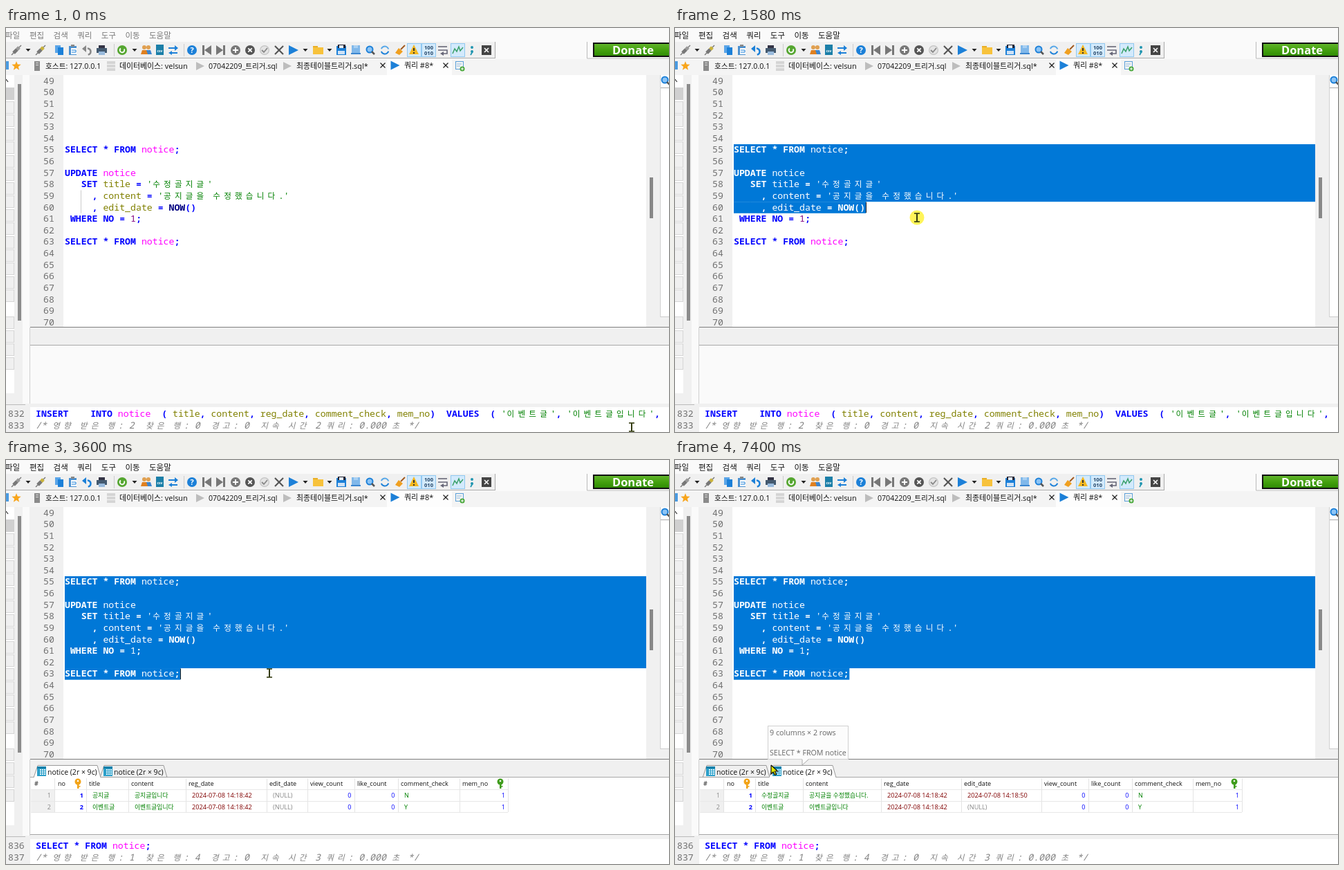
Animation, 959 px wide and 584 px high, one loop 7.86 s. Source, as an HTML page with a canvas:

```html
<!DOCTYPE html>
<html lang="ko">
<head>
<meta charset="utf-8">
<title>SQL editor</title>
<style>
  html, body { margin: 0; height: 100%; overflow: hidden; background: #fff; }
  canvas { display: block; }
</style>
</head>
<body>
<canvas id="stage" width="959" height="584"></canvas>
<script>
const c = document.getElementById('stage').getContext('2d');
const LOOP = 7860, CELL = 7.92, ROW = 16.63, TEXT_X = 85, FIRST_SEL = 55;
const MONO = '"Noto Sans Mono","Noto Sans CJK KR",monospace';
const UI = '"Open Sans","Noto Sans CJK KR","Noto Sans CJK",sans-serif';
const GRAY = '#f0f0f0', BLUE = '#1c80d8', DARK = '#555', NUMBER = '#707070';

const code = {
  55: 'SELECT * FROM notice;',
  57: 'UPDATE notice',
  58: "   SET title = '수정골지글'",
  59: "     , content = '공지글을 수정했습니다.'",
  60: '     , edit_date = NOW()',
  61: ' WHERE NO = 1;',
  63: 'SELECT * FROM notice;'
};

// Mouse path: time, x, y
const path = [
  [0, 905, 577], [250, 700, 480], [500, 330, 290], [700, 130, 195], [830, 88, 174],
  [1160, 88, 174], [1300, 150, 195], [1440, 265, 240], [1580, 350, 274], [1720, 375, 295], [1900, 381, 308],
  [3600, 381, 308], [3800, 350, 325], [4050, 270, 375], [4300, 205, 418], [4430, 185, 440],
  [6330, 185, 440], [6540, 139, 441], [LOOP, 139, 441]
];

const between = (t, a, b) => t >= a && t < b;
const rowTop = n => 168 + (n - FIRST_SEL) * ROW;
const isHangul = ch => ch > '\u3000';
const cells = ch => isHangul(ch) ? 2 : 1;
const columns = s => [...s].reduce((n, ch) => n + cells(ch), 0);

function box(color, x, y, w, h) { c.fillStyle = color; c.fillRect(x, y, w, h); }
function frame(color, x, y, w, h) { c.strokeStyle = color; c.lineWidth = 1; c.strokeRect(x + .5, y + .5, w, h); }
function disc(color, x, y, r) { c.fillStyle = color; c.beginPath(); c.arc(x, y, r, 0, 7); c.fill(); }
function ring(color, w, x, y, r, from = 0, to = 6.3) {
  c.strokeStyle = color; c.lineWidth = w; c.beginPath(); c.arc(x, y, r, from, to); c.stroke();
}
function trace(p) { c.beginPath(); for (let i = 0; i < p.length; i += 2) c.lineTo(p[i], p[i + 1]); }
function poly(color, ...p) { trace(p); c.fillStyle = color; c.fill(); }
function line(color, w, ...p) { trace(p); c.strokeStyle = color; c.lineWidth = w; c.stroke(); }
function cross(color, w, x, y, r) { line(color, w, x - r, y - r, x + r, y + r); line(color, w, x - r, y + r, x + r, y - r); }
function play(color, x, y, r = 7) { poly(color, x - r, y - r, x + r, y, x - r, y + r); }
function drop(x) { poly('#222', x - 3.5, 30, x + 3.5, 30, x, 34); }
function label(s, x, y, size, color = '#111', weight = 400, align = 'left') {
  c.font = `${weight} ${size}px ${UI}`; c.fillStyle = color; c.textAlign = align; c.fillText(s, x, y);
}

function tokenStyle(tok) {
  if (tok[0] === "'") return ['#008000', 400];
  if (tok === 'NOW') return ['#000080', 700];
  if (/^[A-Z]/.test(tok)) return ['#0000ff', 700];
  if (tok === 'notice') return ['#ff00ff', 400];
  if (/^\d/.test(tok)) return ['#800080', 400];
  if (/^\w/.test(tok)) return ['#808000', 400];
  return ['#0000ff', 600];
}
// Fixed cells; Hangul takes two and is set a little smaller.
function mono(s, x, y, color, style = '') {
  c.fillStyle = color; c.textAlign = 'left';
  for (const ch of s) {
    const wide = isHangul(ch);
    c.font = `${style} ${wide ? 11.6 : 13.2}px ${MONO}`;
    c.fillText(ch, wide ? x + .5 : x, y);
    x += cells(ch) * CELL;
  }
  return x;
}
function sql(s, x, y, selected) {
  for (const tok of s.match(/'[^']*'|\w+|./g)) {
    const [color, weight] = tokenStyle(tok);
    x = mono(tok, x, y, selected ? '#fff' : color, weight);
  }
}

function plug(x, color) {
  line('#777', 1.5, x - 7, 39, x + 7, 25);
  line('#777', 5, x - 4, 36, x + 1, 31);
  line(color, 5, x + 1, 31, x + 4, 28);
}
function floppy(color, x) {
  box(color, x - 7, 26, 14, 13); box('#223', x - 5, 24, 11, 5); box('#e8f2fc', x - 3, 25, 6, 4); box('#cfe2f5', x - 5, 33, 10, 5);
}
function person(x, color) { disc('#e0a050', x, 28, 3); poly(color, x - 5, 38, x - 3, 32, x + 3, 32, x + 5, 38); }
function lens(x, y) { disc('#8cc4f5', x, y, 4.5); ring(BLUE, 2, x, y, 4.5); line(DARK, 2.5, x + 3, y + 3, x + 7, y + 7); }

function toolbar(active) {
  box(GRAY, 0, 20, 707, 23);
  line('#aaa', 1, 0, 43.5, 707, 43.5); line('#aaa', 1, 707.5, 20, 707.5, 44);
  plug(15, '#999'); drop(32); plug(50, '#c9b23a');
  box('#5aa5e8', 71, 25, 8, 11); box(BLUE, 75, 28, 8, 11);
  box('#4a90d0', 91, 26, 11, 13); box('#fff', 94, 29, 8, 9); box('#888', 94, 24, 5, 3); line(BLUE, 1, 95, 32, 101, 32, 101, 35, 95, 35);
  const undo = active ? BLUE : '#888';
  poly(undo, 110, 30, 116, 25, 116, 35); ring(undo, 2.5, 118, 34, 4.5, -1.6, 1.4);
  box('#334', 134, 25, 9, 4); box('#445a70', 131, 29, 15, 7); box('#9bd', 134, 34, 9, 5);
  line('#ccc', 1, 156.5, 23, 156.5, 41);
  disc('#55a630', 168, 32, 7); ring('#fff', 1.8, 168, 32, 3.3, -.5, 4); drop(186);
  person(206, '#3c86cf'); person(200, '#e08020');
  box('#1b7fa8', 217, 24, 11, 15); label('csv', 222.5, 35, 5, '#fff', 700, 'center');
  line(BLUE, 2, 235, 29, 245, 29); poly(BLUE, 244, 25, 249, 29, 244, 33);
  line(BLUE, 2, 239, 36, 248, 36); poly(BLUE, 240, 33, 235, 36, 240, 39);
  line('#ccc', 1, 257.5, 23, 257.5, 41);
  disc(BLUE, 269, 32, 7); label('?', 269, 36, 11, '#fff', 700, 'center');
  box('#777', 284, 25, 3, 14); poly('#777', 297, 25, 287, 32, 297, 39);
  box('#777', 314, 25, 3, 14); poly('#777', 304, 25, 314, 32, 304, 39);
  disc('#777', 332, 32, 7); line('#fff', 2, 328, 32, 336, 32); line('#fff', 2, 332, 28, 332, 36);
  disc(DARK, 353, 32, 7); cross('#fff', 1.8, 353, 32, 2.7);
  disc('#c4c4c4', 374, 32, 7); disc('#e4e4e4', 374, 32, 5.8); line('#888', 1.8, 370, 32, 373, 35, 378, 29);
  cross('#555', 2.2, 395, 32, 6);
  play(BLUE, 416, 32); drop(433);
  box('#e9ae25', 444, 26, 7, 4); box('#f7c23c', 444, 28, 15, 10); drop(468);
  floppy(BLUE, 485);
  box('#80b8ea', 500, 25, 12, 11); box('#a9d0f2', 503, 25, 6, 4); line('#3c86cf', 2, 499, 37, 513, 37);
  lens(526, 31);
  ring(BLUE, 2, 548, 32, 5.5, .3, 2.8); ring('#58a8e8', 2, 548, 32, 5.5, 3.5, 6);
  line('#a05a20', 2, 577, 25, 571, 31); poly('#f0a020', 568, 29, 574, 34, 569, 39, 563, 36);
  for (const x of [580, 601, 643]) { box('#d3eafc', x, 22, 20, 19); frame('#90c8f0', x, 22, 20, 19); }
  poly('#f5b820', 590, 24, 597, 38, 583, 38); box('#333', 589, 29, 2, 4); box('#333', 589, 35, 2, 2);
  label('100', 611.5, 31, 7.5, '#246', 700, 'center'); label('010', 611.5, 39, 7.5, '#246', 700, 'center');
  line('#667', 1.6, 625, 27, 638, 27); line('#667', 1.6, 625, 32, 638, 32, 638, 37, 632, 37); poly('#667', 628, 37, 633, 34, 633, 40);
  line('#39a06a', 1.5, 646, 37, 649, 30, 652, 34, 655, 27, 657, 33, 661, 28);
  disc('#2095b0', 674, 28, 2); disc('#2095b0', 674, 34, 2); line('#2095b0', 1.8, 675, 34, 672, 39);
  box('#444', 688, 25, 14, 14); cross('#fff', 1.6, 695, 32, 3);

  line('#bbb', 1, 840.5, 20, 840.5, 44, 959, 44);
  const g = c.createLinearGradient(0, 22, 0, 42);
  g.addColorStop(0, '#62b52c'); g.addColorStop(.5, '#43a00e'); g.addColorStop(1, '#2c8803');
  box('#111', 849, 21, 110, 21); box(g, 851, 23, 108, 17);
  label('Donate', 907, 38, 16.5, '#fff', 700, 'center');
}

function tabs() {
  box('#f4f4f4', 0, 45, 959, 23);
  box('#fdfdfd', 551, 45, 94, 23);
  box('#4a9be0', 0, 48, 4, 12);
  c.beginPath();
  for (let i = 0; i < 10; i++) {
    const r = i % 2 ? 3 : 7, a = -Math.PI / 2 + i * Math.PI / 5;
    c.lineTo(15 + r * Math.cos(a), 55 + r * Math.sin(a));
  }
  c.fillStyle = '#f8a51b'; c.fill();
  box('#8a8a8a', 41, 48, 8, 14); box('#ddd', 43, 50, 4, 1); box('#ddd', 43, 53, 4, 1);
  for (const y of [48, 53, 58]) box('#d5d5d5', 146, y, 12, 4);
  play('#bdbdbd', 281, 55, 6); play('#bdbdbd', 407, 55, 6); play(BLUE, 563, 54, 6.5);
  label('호스트: 127.0.0.1', 57, 59, 10.7);
  label('데이터베이스: velsun', 164, 59, 10.9);
  label('07042209_트리거.sql', 293, 59, 10.6);
  label('최종테이블트리거.sql*', 420, 59, 10.9);
  label('쿼리 #8*', 576, 58, 10.9);
  cross('#222', 1.3, 545, 54, 3.5); cross('#222', 1.3, 636, 54, 3.5);
  frame('#5a9fd8', 650, 48, 11, 11); line('#8ab8e0', 1, 652, 52, 659, 52); line('#8ab8e0', 1, 652, 55, 657, 55);
  disc('#49a83a', 660, 59, 3.5); line('#fff', 1, 658, 59, 662, 59); line('#fff', 1, 660, 57, 660, 61);
}

function sidePanels() {
  box(GRAY, 0, 68, 35, 480);
  box('#fff', 0, 68, 12, 460);
  box('#fafafa', 24, 68, 10, 475);
  line('#333', 1.2, 0, 74, 3, 78);
  box('#d0d0d0', 0, 86, 12, 18);
  for (let i = 0; i < 20; i++) {
    if (i === 15) continue;
    const y = Math.round(106 + 19.45 * i);
    box(GRAY, 0, y, 11, 17); frame('#d6d6d6', -2, y, 13, 17);
  }
  box('#8c8c8c', 17, 81, 5, 342);
  line('#bbb', 1, 0, 544.5, 28, 544.5);
  box(GRAY, 942, 68, 5, 365); box('#fff', 947, 68, 12, 350); box(GRAY, 947, 418, 12, 15);
  line('#d0d0d0', 1, 946.5, 68, 946.5, 418); line('#aaa', 1, 947, 86.5, 959, 86.5); line('#ccc', 1, 947, 417.5, 959, 417.5);
  lens(953, 75);
}

function editor(selRow, selCol, caretOn) {
  box('#fff', 35, 68, 891, 365);
  box(GRAY, 35, 68, 48, 365);
  box(GRAY, 926, 68, 16, 365);
  box('#888', 931, 216, 5, 59);
  line('#ccc', 1, 108.5, rowTop(59), 108.5, rowTop(61));
  if (selRow) {
    box('#0078d7', TEXT_X, rowTop(FIRST_SEL), 841, (selRow - FIRST_SEL) * ROW);
    box('#0078d7', TEXT_X, rowTop(selRow), selCol * CELL + 1, ROW);
  }
  for (let n = 49; n <= 70; n++) {
    const y = Math.round(rowTop(n) + 12.4);
    mono(String(n), 54, y, NUMBER);
    if (code[n]) sql(code[n], TEXT_X, y, n <= selRow);
  }
  if (caretOn) box('#222', Math.floor(TEXT_X + selCol * CELL) + 1, rowTop(selRow) + .5, 1, 15.5);
  box('#808080', 35, 432, 907, 1);
  box('#808080', 942, 432, 17, 1);
}

function key(color, x) {
  disc(color, x, 465, 4.5); disc('#fff', x, 464, 1.3); box(color, x - 1, 468, 2.5, 7); box(color, x, 471, 3.5, 1.5);
}
function resultTab(x, active) {
  const shape = [x, 459, x + 6, 441.5, x + 92, 441.5, x + 97, 459];
  poly(active ? '#fff' : GRAY, ...shape);
  line('#999', 1, ...shape);
  if (!active) line('#a0a0a0', 1, x, 458.5, x + 97, 458.5);
  box('#2c9fc9', x + 5, 443, 13, 14); box('#1680aa', x + 5, 443, 13, 3);
  for (let i = 0; i < 9; i++) box('#e4f6fc', x + 9 + i % 3 * 3, 447 + (i / 3 | 0) * 3, 2, 2);
  label('notice (2r × 9c)', x + 20, 455, 10.5);
}
function grid(second) {
  const names = ['title', 'content', 'reg_date', 'edit_date', 'view_count', 'like_count', 'comment_check', 'mem_no'];
  const xs = second ? [120, 189, 302, 418, 534, 602, 665, 753, 824] : [120, 181, 264, 381, 440, 508, 571, 660, 730];
  const end = xs[8] - 4, stamp = '2024-07-08 14:18:42';
  const rows = [
    second ? ['수정골지글', '공지글을 수정했습니다.', stamp, '2024-07-08 14:18:50'] : ['공지글', '공지글입니다', stamp, '(NULL)'],
    ['이벤트글', '이벤트글입니다', stamp, '(NULL)']
  ];
  box('#fff', 36, 459, 923, 82);
  box(GRAY, 36, 476, 34, 33);
  for (const y of [476, 493, 509]) box('#e8e8e8', 36, y, end - 36, 1);
  for (const x of [74, ...xs]) box('#e4e4e4', x - 4, 460, 1, 49);
  label('#', 41, 471, 9); label('no', 75, 471, 9);
  names.forEach((s, i) => label(s, xs[i], 471, 9.1));
  key('#f2a316', 104); key('#3f9c1c', end - 11);
  rows.forEach((row, r) => {
    const y = 488 + r * 16.5;
    label(r + 1, 65, y, 9, '#888', 400, 'right');
    label(r + 1, 112, y, 9, '#0000ff', 700, 'right');
    row.forEach((s, i) => label(s, xs[i] + 5, y, i < 2 ? 8.8 : 9.2, s === '(NULL)' ? '#888' : i < 2 ? '#008000' : '#800000'));
    for (const i of [5, 6]) label('0', xs[i] - 8.5, y, 9, '#0000ff', 400, 'right');
    label('NY'[r], xs[6] + 5, y, 9, '#008000');
    label('1', end - 4, y, 9, '#0000ff', 400, 'right');
  });
}
function results(shown, second) {
  box(GRAY, 35, 433, 924, 25);
  box('#fafafa', 35, 459, 924, 84);
  box('#a8a8a8', 35, 458, 924, 1);
  if (shown) {
    grid(second);
    resultTab(second ? 40 : 136, false);
    resultTab(second ? 136 : 40, true);
    box('#a0a0a0', 35, 541, 924, 1);
  }
  box('#d0d0d0', 34, 433, 1, 110);
  box(GRAY, 28, 543, 931, 5);
}

function log(done) {
  box('#fff', 0, 548, 959, 36);
  box(GRAY, 0, 548, 35, 36);
  const [n, rows, found, queries] = done ? [836, 1, 4, 3] : [832, 2, 0, 2];
  mono(String(n), 3, 562, NUMBER);
  mono(String(n + 1), 3, 579, NUMBER);
  sql(done ? code[55] : "INSERT    INTO notice  ( title, content, reg_date, comment_check, mem_no)  VALUES  ( '이벤트글', '이벤트글입니다',", 43, 562);
  mono(`/* 영향 받은 행: ${rows}  찾은 행: ${found}  경고: 0  지속 시간 ${queries} 쿼리: 0.000 초 */`, 43, 579, '#808080', 'italic');
}

function tooltip(alpha) {
  if (alpha <= 0) return;
  c.globalAlpha = Math.min(1, alpha);
  box('#fcfcfc', 135, 385, 115, 48);
  frame('#d0d0d0', 134, 384, 116, 48);
  poly('#fcfcfc', 184, 432, 184, 441, 193, 432);
  line('#aaa', 1, 184, 433, 184, 441, 193, 433);
  label('9 columns × 2 rows', 137, 398, 10.7, '#666');
  label('SELECT * FROM notice', 137, 427, 10.7, '#666');
  c.globalAlpha = 1;
}

function pointer([x, y], pressed) {
  if (pressed) disc('rgba(255,238,0,.65)', x, y, 10.5);
  if (between(y, 433, 548)) {
    const shape = [x, y, x, y + 13, x + 3, y + 10, x + 5.5, y + 14.5, x + 7.5, y + 13.5, x + 5.5, y + 9, x + 9.5, y + 9, x, y];
    poly('#dfe800', ...shape); line('#111', 1.2, ...shape);
  } else {
    line('#333a10', 2, x, y - 6, x, y + 6);
    for (const d of [-6, 6]) line('#333a10', 1.6, x - 4, y + d, x + 4, y + d);
  }
}

function mouseAt(t) {
  const phase = t < 1100 ? 0 : 40;
  t = Math.max(0, Math.floor((t - phase) / 70) * 70 + phase);
  const i = path.findIndex(p => p[0] > t), [t0, x0, y0] = path[i - 1], [t1, x1, y1] = path[i];
  const k = (t - t0) / (t1 - t0);
  return [x0 + (x1 - x0) * k, y0 + (y1 - y0) * k];
}
function selectionAt(t) {
  if (t < 1160) return [0, 0];
  const [x, y] = mouseAt(Math.min(Math.max(t - 70, 1160), 2200));
  const row = FIRST_SEL + Math.floor((y - 168) / ROW);
  return [row, Math.min(Math.round((x - TEXT_X) / CELL), columns(code[row] || ''))];
}

function draw(now) {
  const t = now % LOOP, active = t >= 1160, second = t >= 4900;
  const caretOn = [[1160, 2480], [3600, 4130], [4660, 5200], [5800, 6330], [6870, 7400]].some(([a, b]) => between(t, a, b));
  box('#fafafa', 0, 0, 959, 584);
  ['파일', '편집', '검색', '쿼리', '도구', '이동', '도움말'].forEach((s, i) =>
    label(s, i ? 34 + (i - 1) * 34.6 : -1, 15, 11.5, active ? '#111' : '#777'));
  toolbar(active);
  tabs();
  sidePanels();
  editor(...selectionAt(t), caretOn);
  results(t >= 3010, second);
  log(t >= 2940);
  tooltip((t - 4620) / 220);
  pointer(mouseAt(t), between(t, 1160, 2210) || between(t, 4860, 5000));
  requestAnimationFrame(() => draw(performance.now()));
}
draw(0);
</script>
</body>
</html>
```
